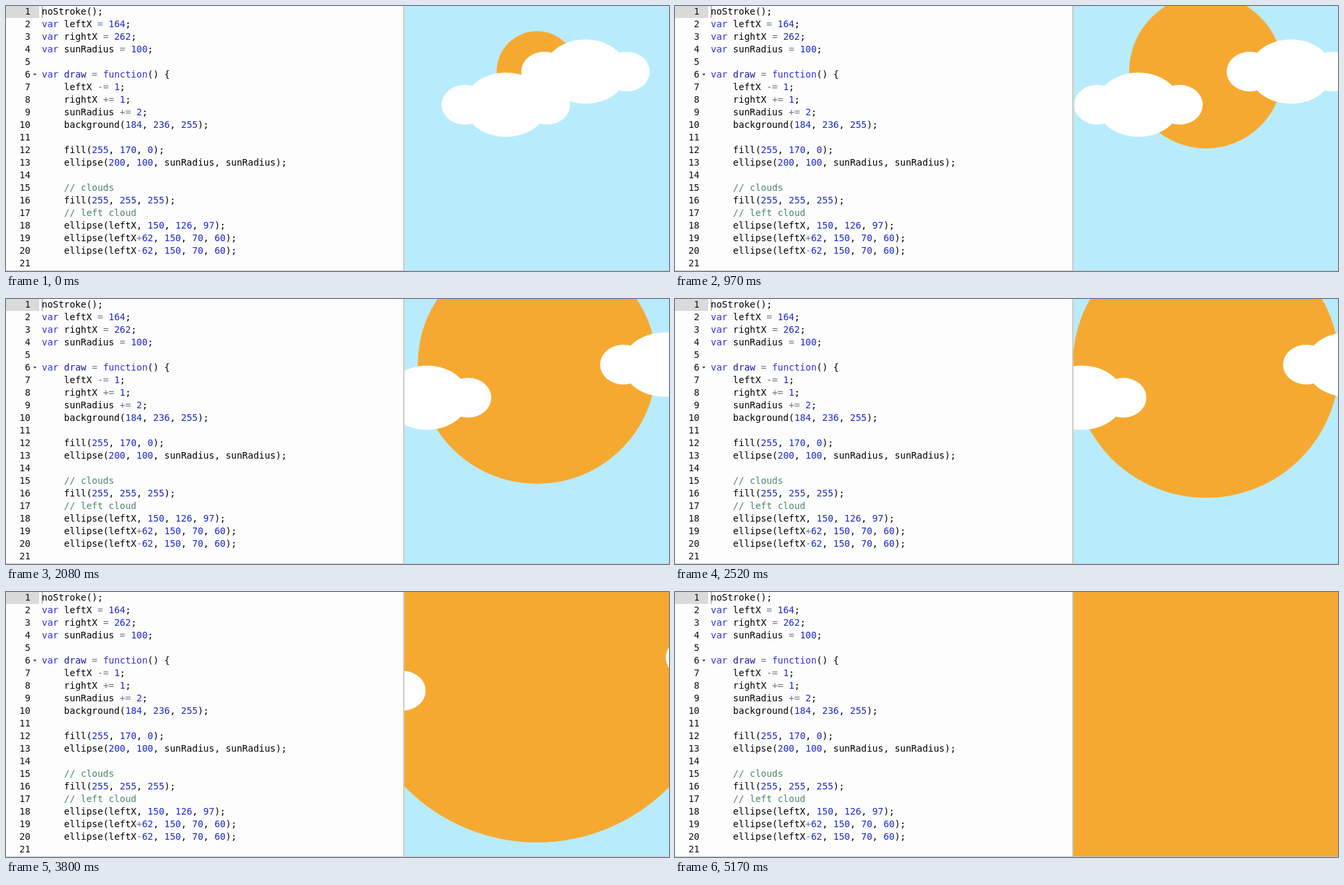
Write an HTML page with a canvas that moves like this. It is 1000x400 px and loops after 6460 ms.

```html
<!DOCTYPE html>
<html lang="en">
<head>
<meta charset="utf-8">
<title>Sunrise program</title>
<style>
html, body { margin: 0; width: 100%; height: 100%; overflow: hidden; background: #fdfdfd; }
canvas { display: block; width: 1000px; height: 400px; }
</style>
</head>
<body>
<canvas id="stage" width="1000" height="400"></canvas>
<script>
const ctx = document.getElementById("stage").getContext("2d");
const LOOP = 6460, REPAINT = 63;
const PANEL = { x: 601, width: 399, height: 399 };
const CHAR = 8.4, LINE = 19, CODE_X = 54, BASELINE = 13;

const source = `noStroke();
var leftX = 164;
var rightX = 262;
var sunRadius = 100;

var draw = function() {
    leftX -= 1;
    rightX += 1;
    sunRadius += 2;
    background(184, 236, 255);

    fill(255, 170, 0);
    ellipse(200, 100, sunRadius, sunRadius);

    // clouds
    fill(255, 255, 255);
    // left cloud
    ellipse(leftX, 150, 126, 97);
    ellipse(leftX+62, 150, 70, 60);
    ellipse(leftX-62, 150, 70, 60);
`.split("\n");

// Key points: time in ms and the number of draw() calls made by then
const keys = [[0, 11], [570, 45], [1390, 91], [2080, 130], [3030, 183], [3800, 229], [5170, 312]];

// Between key points the calls rise evenly, shown in equal repaints
function drawCalls(time) {
  const next = keys.findIndex(([t]) => t > time);
  if (next < 0) return keys.at(-1)[1];
  const [t0, k0] = keys[next - 1], [t1, k1] = keys[next];
  const steps = Math.round((t1 - t0) / REPAINT);
  const step = Math.floor((time - t0) / (t1 - t0) * steps);
  return Math.round(k0 + (k1 - k0) * step / steps);
}

function rect(color, x, y, w, h) {
  ctx.fillStyle = color;
  ctx.fillRect(x, y, w, h);
}

function ellipse(x, y, w, h) {
  ctx.beginPath();
  ctx.ellipse(x, y, w / 2, h / 2, 0, 0, Math.PI * 2);
  ctx.fill();
}

function cloud(x, y) {
  ellipse(x, y, 126, 97);
  ellipse(x + 62, y, 70, 60);
  ellipse(x - 62, y, 70, 60);
}

function tokenColor(token) {
  if (token.startsWith("//")) return "#4c886b";
  if (/^(var|function)$/.test(token)) return "#2f2fe6";
  if (token === "draw") return "#1414a6";
  if (/^\d/.test(token)) return "#1a28cc";
  if (/^[-+=]/.test(token)) return "#687687";
  return "#000";
}

function drawEditor() {
  rect("#fdfdfd", 0, 0, 599, 399);
  rect("#dadada", 0, 0, 50, 18);
  rect("#888", 54, 0, 1, 18);
  ctx.font = "13.95px 'DejaVu Sans Mono', monospace";
  source.forEach((line, row) => {
    const y = BASELINE + row * LINE;
    ctx.textAlign = "right";
    ctx.fillStyle = "#111";
    ctx.fillText(row + 1, 37, y);
    ctx.textAlign = "left";
    for (const match of line.matchAll(/\/\/.*|\w+|[-+=]+|[^\s\w]/g)) {
      ctx.fillStyle = tokenColor(match[0]);
      ctx.fillText(match[0], CODE_X + match.index * CHAR, y);
    }
  });
  ctx.fillStyle = "#444";
  ctx.beginPath();
  ctx.moveTo(41, 102);
  ctx.lineTo(46, 102);
  ctx.lineTo(43.5, 105);
  ctx.fill();
  rect("#cccccc", 599, 0, 1, 399);
  rect("#d3c8b8", 600, 0, 1, 399);
  rect("#c8c8c8", 0, 399, 1000, 1);
}

function drawPanel(calls) {
  ctx.save();
  ctx.beginPath();
  ctx.rect(PANEL.x, 0, PANEL.width, PANEL.height);
  ctx.clip();
  rect("#b8ecfc", PANEL.x, 0, PANEL.width, PANEL.height);
  ctx.translate(PANEL.x, -1);
  ctx.fillStyle = "#f6a931";
  ellipse(200, 100, 100 + 2 * calls, 100 + 2 * calls);
  ctx.fillStyle = "#fefefe";
  cloud(164 - calls, 150);
  cloud(262 + calls, 100);
  ctx.restore();
}

const start = performance.now();
function tick() {
  drawPanel(drawCalls((performance.now() - start) % LOOP));
  requestAnimationFrame(tick);
}
drawEditor();
tick();
</script>
</body>
</html>
```
